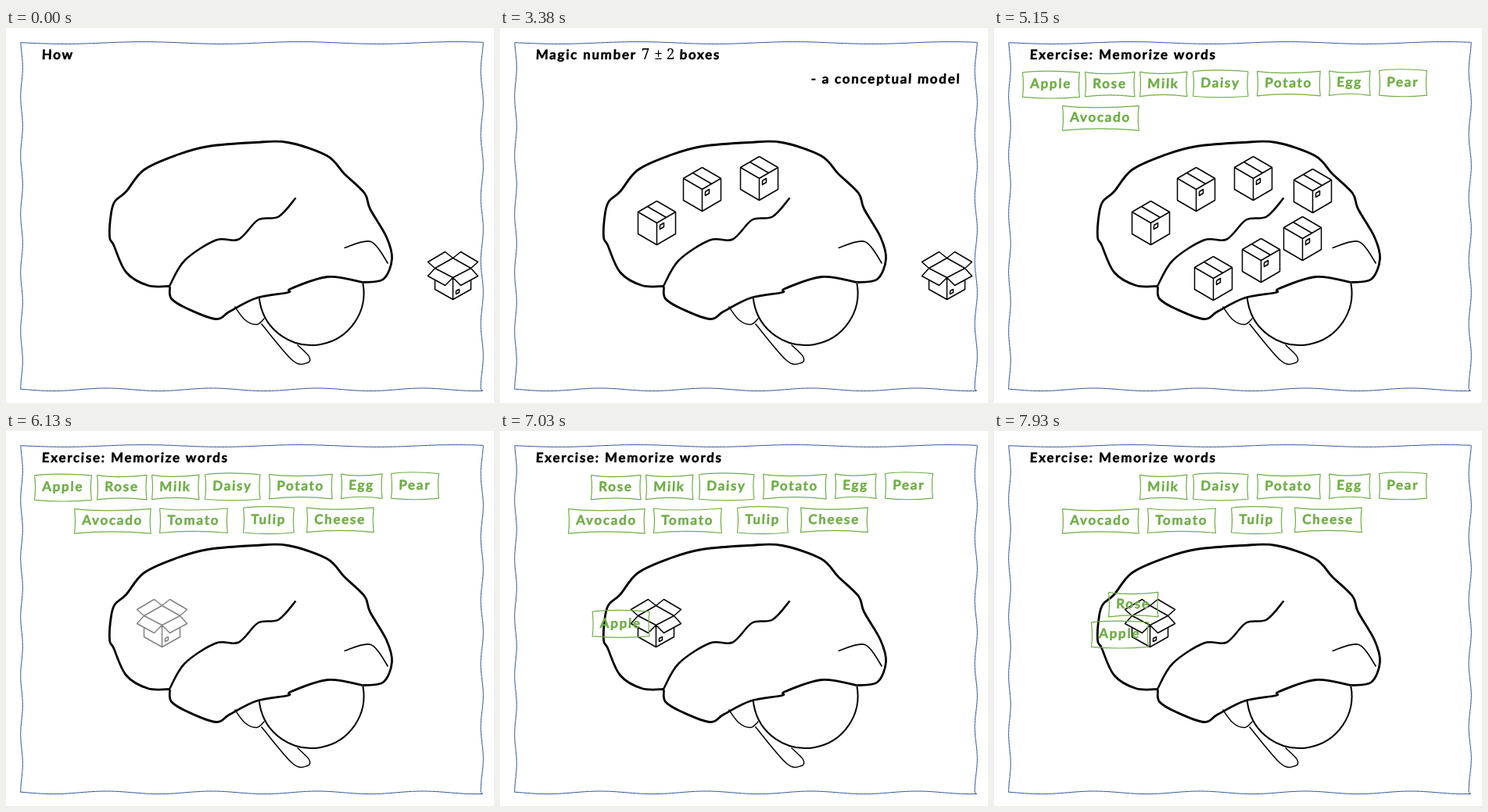
Recreate the animation shown at these times as an HTML page with a canvas. Size 624 by 480 pixels, loop 7990 ms.

```html
<!DOCTYPE html>
<html lang="en">
<head>
<meta charset="utf-8">
<title>Memory boxes</title>
<style>
html, body { margin: 0; width: 100%; height: 100%; overflow: hidden; background: #fff; }
canvas { display: block; width: 624px; height: 480px; }
</style>
</head>
<body>
<canvas id="stage" width="624" height="480"></canvas>
<script>
const ctx = document.getElementById('stage').getContext('2d');
const LOOP = 7990;
const EXERCISE = 4380;
const GREEN = '#70ad47';
const HAND = '700 17px Lato, "Open Sans", sans-serif';
const MATH = '19px "Noto Serif", "Liberation Serif", serif';

const progress = (t, start, end) => Math.min(1, Math.max(0, (t - start) / (end - start)));
const wave = (v, crest, period, size) => size * Math.cos((v - crest) * 2 * Math.PI / period);

function stroke(width, color = '#000') {
  ctx.lineWidth = width;
  ctx.strokeStyle = color;
  ctx.stroke();
}

// Smooth curve through a flat list of x, y pairs.
function curve(p, width) {
  const last = p.length / 2 - 1;
  const at = (i, axis) => p[Math.min(last, Math.max(0, i)) * 2 + axis];
  const lead = (i, axis, sign) => at(i, axis) + sign * (at(i + 1, axis) - at(i - 1, axis)) / 6;
  ctx.beginPath();
  ctx.moveTo(p[0], p[1]);
  for (let i = 0; i < last; i++) {
    ctx.bezierCurveTo(lead(i, 0, 1), lead(i, 1, 1),
      lead(i + 1, 0, -1), lead(i + 1, 1, -1), at(i + 1, 0), at(i + 1, 1));
  }
  stroke(width);
}

function trace(p) {
  ctx.moveTo(p[0], p[1]);
  for (let i = 2; i < p.length; i += 2) ctx.lineTo(p[i], p[i + 1]);
}

function setFont(font) {
  ctx.font = font;
  ctx.letterSpacing = font === HAND ? '1.7px' : '0px';
}

function write(str, x, y, color = '#000', font = HAND) {
  ctx.save();
  setFont(font);
  ctx.fillStyle = ctx.strokeStyle = color;
  ctx.lineWidth = 0.5;
  ctx.transform(1, 0, font === HAND ? -0.04 : 0, 1, x, y);
  ctx.fillText(str, 0, 0);
  if (font === HAND) ctx.strokeText(str, 0, 0);
  ctx.restore();
}

function textWidth(str, font = HAND) {
  setFont(font);
  return ctx.measureText(str).width;
}

// Words appear one by one; later words keep their place while hidden ones wait.
const arrival = (i, start) => start + (i ? 60 + 200 * i : 0);

function reveal(words, x, y, t, start, first = 0) {
  words.forEach((word, i) => {
    const font = /\d/.test(word) ? MATH : HAND;
    if (t >= arrival(first + i, start)) write(word, x, y, '#000', font);
    x += textWidth(word, font) + 6;
  });
}

function drawBorder() {
  ctx.beginPath();
  for (let x = 19; x <= 609; x += 5) ctx.lineTo(x, 18.5 + wave(x, 75, 200, 1.4));
  for (let y = 18; y <= 462; y += 4) ctx.lineTo(608.2 + wave(y, 95, 81, 1.6), y);
  for (let x = 609; x >= 19; x -= 5) ctx.lineTo(x, 462.3 + wave(x, 60, 135, 1.8));
  for (let y = 462; y >= 18; y -= 4) ctx.lineTo(19.5 + wave(y, 50, 75, 1.3), y);
  ctx.closePath();
  stroke(1, '#2f5597');
}

const crown = [
  209, 330, 181, 329, 153, 312, 137, 277, 132, 267, 134, 236, 139, 221, 153, 209,
  176, 181, 218, 162, 258, 151, 318, 146, 360, 146, 410, 163, 432, 186, 458, 211,
  465, 231, 486, 267, 493, 295, 482, 321, 456, 325
];
const base = [
  456, 325, 411, 318, 364, 333, 360, 338, 320, 345, 286, 362, 268, 372, 232, 359,
  211, 346, 209, 331
];
const fold = [
  208, 331, 228, 297, 268, 271, 297, 270, 322, 245, 348, 241, 370, 217
];

function drawBrain() {
  curve(crown, 2.8);
  curve(base, 2.8);
  curve(fold, 2.5);
  curve([432, 281, 466, 273, 488, 301], 1.7);
  ctx.beginPath();
  ctx.arc(390, 338.5, 67, -0.18, Math.PI - 0.1);
  stroke(2);
  curve([292, 356, 305, 373, 320, 379, 330, 371], 1.5);
  curve([326, 378, 366, 425, 385, 428, 387, 420, 372, 405], 1.5);
}

const parcels = [
  [200, 249], [258, 206], [331, 192], [407, 208], [394, 269], [341, 297], [280, 320]
];

function drawParcel([x, y]) {
  const r = 24, q = 14, h = 28;
  ctx.save();
  ctx.translate(x, y);
  ctx.beginPath();
  trace([0, -h, r, -q, r, q, 0, h, -r, q, -r, -q, 0, -h]);
  trace([-r, -q, 0, 0, r, -q]);
  trace([0, 0, 0, h]);
  trace([-r / 2, -(h + q) / 2, r / 2, -q / 2]);
  trace([4, 3, 9, 0, 9, 5, 4, 8, 4, 3]);
  stroke(1.5);
  ctx.restore();
}

function drawOpenBox(x, y) {
  ctx.save();
  ctx.translate(x, y);
  ctx.beginPath();
  for (const side of [-1, 1]) {
    const half = p => trace(p.map((v, i) => i % 2 ? v : v * side));
    half([0, -25, 10, -33, 32, -20, 23, -12, 0, -25]);
    half([23, -12, 32, -2, 10, 10, 0, 0, 23, -12]);
    half([23, 3, 23, 15, 0, 28, 0, 0]);
  }
  trace([4, 17, 8, 15, 8, 19, 4, 21, 4, 17]);
  stroke(1.5);
  ctx.restore();
}

// Each row: top edge, then words with their left edges.
const rows = [
  [56.5, { Apple: 36, Rose: 116, Milk: 186, Daisy: 254, Potato: 336, Egg: 428, Pear: 492 }],
  [99.5, { Avocado: 87, Tomato: 196, Tulip: 303, Cheese: 384 }]
];
const cards = rows.flatMap(([top, words]) =>
  Object.entries(words).map(([word, x]) => ({ word, x, y: top - x * 0.005 })));
const moves = {
  Apple: { start: 6390, end: 7060, dx: 88, dy: 188 },
  Rose: { start: 7060, end: 7930, dx: 30, dy: 150 }
};

function drawCard({ word, x, y }, i, t) {
  const w = textWidth(word) + 20, h = 31.5;
  const bend = i % 3 ? 2.5 : -2;
  const move = moves[word];
  ctx.save();
  if (move) {
    const k = progress(t, move.start, move.end) ** 1.7;
    ctx.translate(move.dx * k, move.dy * k);
  }
  ctx.translate(x, y);
  ctx.beginPath();
  ctx.moveTo(0, 0);
  ctx.bezierCurveTo(w * 0.3, bend * 1.4, w * 0.65, bend, w, 0);
  ctx.quadraticCurveTo(w - 2, h / 2, w, h);
  ctx.bezierCurveTo(w * 0.7, h - bend, w * 0.35, h - bend * 1.2, 0, h);
  ctx.quadraticCurveTo(2, h / 2, 0, 0);
  stroke(1.2, GREEN);
  write(word, 9.5, 20.5, GREEN);
  ctx.restore();
}

function drawIntro(t) {
  if (t < 1860) reveal(['How', 'to', 'understand', 'your', 'working', 'memory'], 45, 39, t, 0);
  reveal(['-', 'a', 'conceptual', 'model'], 397, 70, t, 0, 6);
  reveal(['Magic', 'number', '7', '± 2', 'boxes'], 45, 39, t, 1920);
  drawOpenBox(571, 319);
}

function drawExercise(t) {
  reveal(['Exercise:', 'Memorize', 'words'], 45, 39, t, 0);
  ctx.globalAlpha = progress(t, 5890, 6390);
  drawOpenBox(199, 248);
  ctx.globalAlpha = 1;
  cards.forEach((card, i) => {
    if (t >= 4240 + 130 * i) drawCard(card, i, t);
  });
}

function render(t) {
  ctx.setTransform(1, 0, 0, 1, 0, 0);
  ctx.fillStyle = '#fff';
  ctx.fillRect(0, 0, 624, 480);
  ctx.translate(0.5, 0.5);
  ctx.lineJoin = 'round';
  drawBorder();
  drawBrain();
  ctx.globalAlpha = 1 - progress(t, 5290, 5890);
  parcels.forEach((parcel, i) => {
    if (t >= arrival(5 + i, 1920)) drawParcel(parcel);
  });
  ctx.globalAlpha = 1;
  (t < EXERCISE ? drawIntro : drawExercise)(t);
}

const began = performance.now();
function tick() {
  render((performance.now() - began) % LOOP);
  requestAnimationFrame(tick);
}
tick();
</script>
</body>
</html>
```
